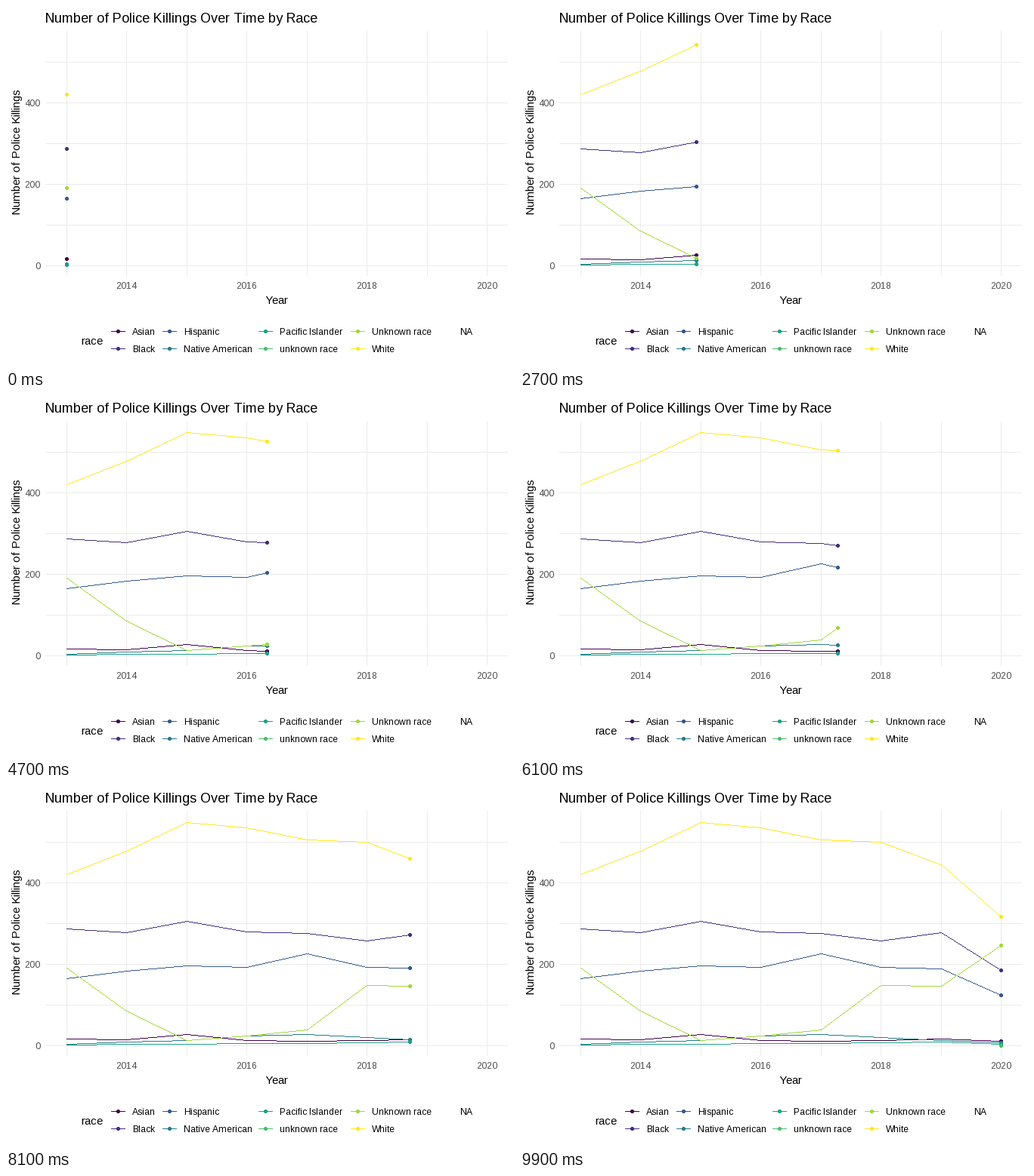
A matplotlib script for the animation above (10000 ms loop, 672 by 480 pixels).

```python
import numpy as np
import matplotlib.pyplot as plt
from matplotlib.animation import FuncAnimation

W, H, DPI = 672, 480, 96
FRAMES, INTERVAL = 100, 100

plt.rcParams.update({
    "font.family": "Liberation Sans",
    "text.hinting": "force_autohint",
    "text.hinting_factor": 1,   # whole-pixel glyph advances
    "text.kerning_factor": 6,   # no kerning
})

# yearly counts, 2013 to 2020
COUNTS = {
    "Asian": [17, 15, 28, 13, 11, 13, 17, 12],
    "Black": [287, 278, 306, 280, 276, 259, 278, 185],
    "Hispanic": [165, 184, 197, 194, 226, 193, 190, 124],
    "Native American": [5, 10, 13, 24, 28, 21, 13, 8],
    "Pacific Islander": [3, 4, 4, 6, 6, 9, 10, 5],
    "unknown race": [1],        # 2020 only
    "Unknown race": [191, 86, 14, 24, 39, 148, 147, 247],
    "White": [422, 478, 549, 536, 506, 500, 445, 317],
}
YEARS = np.arange(8)
COLORS = plt.cm.viridis(np.linspace(0, 1, len(COUNTS)), bytes=True)[:, :3]
GRID, GREY = 235, "#4D4D4D"
LEFT, RIGHT, TOP, BOTTOM = 52, 664, 33, 358


def pixel(v):
    return np.floor(np.asarray(v, float) + 0.5).astype(int)


def year_x(k):
    return pixel(80 + 556 / 7 * np.asarray(k))


def count_y(n):
    return pixel(344.4 - 0.54 * np.asarray(n))


def draw_line(img, xs, ys, color):
    """Polyline one pixel wide, without smoothing."""
    for x0, y0, x1, y1 in zip(xs, ys, xs[1:], ys[1:]):
        n = max(abs(x1 - x0), abs(y1 - y0)) + 1
        img[pixel(np.linspace(y0, y1, n)), pixel(np.linspace(x0, x1, n))] = color


def draw_dot(img, x, y, color):
    """Disc five pixels across."""
    dy, dx = np.mgrid[-2:3, -2:3]
    disc = dx**2 + dy**2 < 6.25
    img[y + dy[disc], x + dx[disc]] = color


# grid
base = np.full((H, W, 3), 255, np.uint8)
base[count_y(np.arange(0, 600, 100)), LEFT:RIGHT] = GRID
base[TOP:BOTTOM, year_x(YEARS)] = GRID

fig = plt.figure(figsize=(W / DPI, H / DPI), dpi=DPI, facecolor="white")
ax = fig.add_axes([0, 0, 1, 1])
ax.axis("off")


def label(x, y, s, px, color="black", **kw):
    ax.text(x, y, s, fontsize=px * 72 / DPI, color=color, va="baseline", **kw)


# titles and axis labels
label(52, 22, "Number of Police Killings Over Time by Race", 18)
label(342, 395, "Year", 15)
label(19, 277, "Number of Police Killings", 15, rotation=90,
      rotation_mode="anchor")
for n in (0, 200, 400):
    label(45, count_y(n) + 5, str(n), 12, GREY, ha="right")
for k in (1, 3, 5, 7):
    label(year_x(k) - 14, 375, str(2013 + k), 12, GREY)

# legend, filled column by column
label(99, 449, "race", 15)
for i, (name, color) in enumerate(zip(COUNTS, COLORS)):
    x, y = (148, 216, 343, 465)[i // 2], 431 + 23 * (i % 2)
    draw_line(base, (x - 9, x + 9), (y, y), color)
    draw_dot(base, x, y, color)
    label(x + 19, y + 5, name, 12)
label(600, 436, "NA", 12)

view = ax.imshow(base, extent=(0, W, H, 0), aspect="auto",
                 interpolation="nearest")
KEYS = np.round(YEARS * (FRAMES - 1) / 7)   # each year falls on a whole frame


def update(frame):
    t = np.interp(frame, KEYS, YEARS)
    ks = np.append(np.arange(np.ceil(t)), t)
    img = base.copy()
    tips = []
    for counts, color in zip(COUNTS.values(), COLORS):
        if len(counts) == 1:
            if t == YEARS[-1]:
                tips.append((year_x(t), count_y(counts[0]), color))
            continue
        xs, ys = year_x(ks), count_y(np.interp(ks, YEARS, counts))
        draw_line(img, xs, ys, color)
        tips.append((xs[-1], ys[-1], color))
    for tip in tips:
        draw_dot(img, *tip)
    view.set_data(img)
    return [view]


anim = FuncAnimation(fig, update, frames=FRAMES, interval=INTERVAL,
                     repeat=True, repeat_delay=0, blit=False)
plt.show()
```
